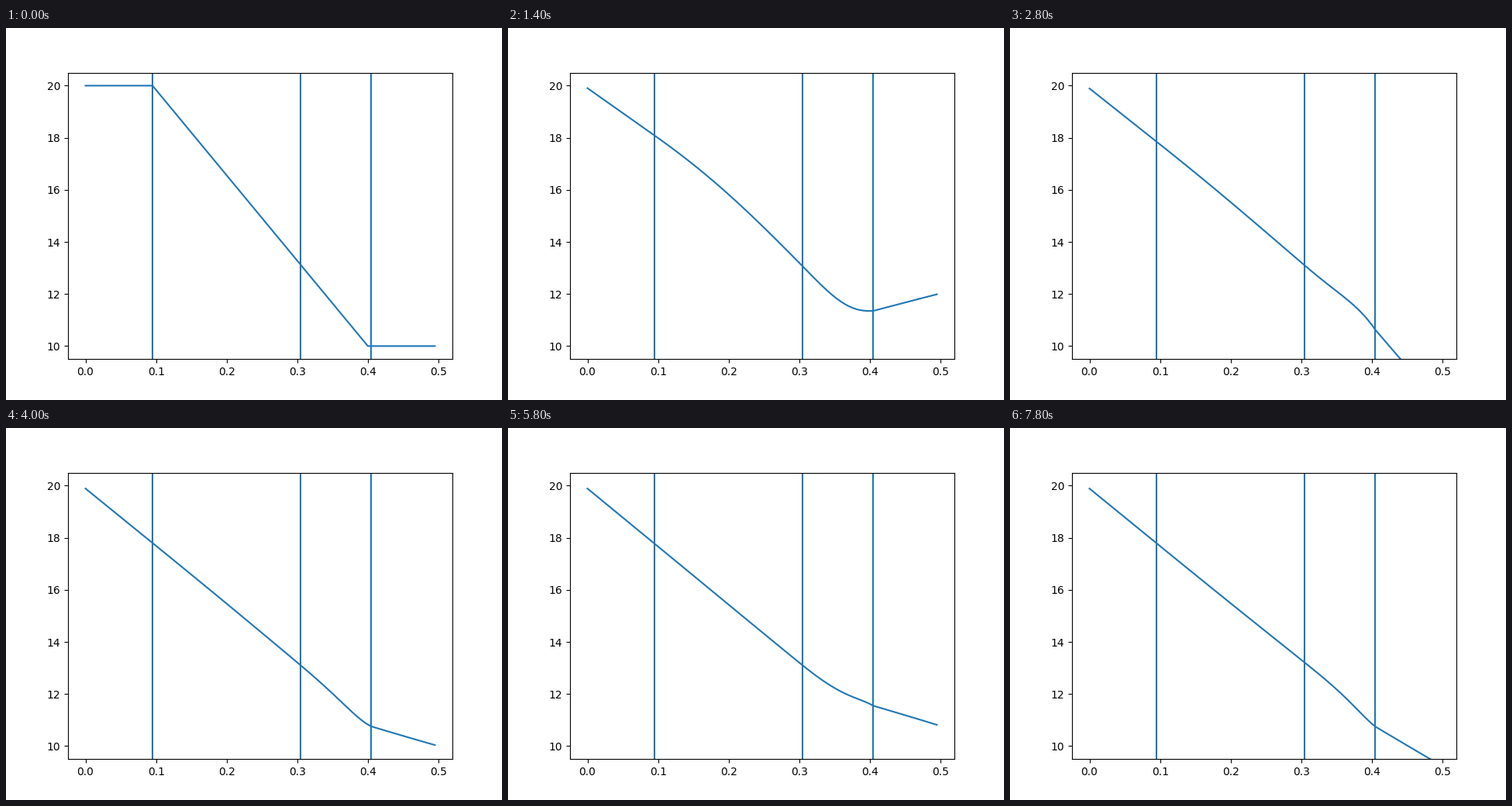
Write a matplotlib script that moves like this. It is 640 px wide and 480 px high and loops after 8 s.

```python
import numpy as np
import matplotlib.pyplot as plt
from matplotlib.animation import FuncAnimation

FRAMES, INTERVAL = 40, 200
N, DX = 100, 0.005
JOINTS = (19, 61, 81)
SUBSTEPS = 40

x = np.arange(N) * DX

# Diffusivity of each layer, in square metres per frame
alpha = np.full(N, 0.1)
alpha[JOINTS[0] + 1:JOINTS[1]] = 1.54e-3
alpha[JOINTS[1]:JOINTS[2]] = 1.74e-4

INSIDE = 20.0
JOINT_LOSS = 6.3  # change of slope at the outer joint


def outside(t):
    return 10 + 2.5 * np.sin(2 * np.pi * t / 20)


def simulate():
    """Temperature profile per frame, by implicit time steps."""
    dt = 1 / SUBSTEPS
    r = alpha * dt / DX**2
    system = np.diag(1 + 2 * r) - np.diag(r[:-1], 1) - np.diag(r[1:], -1)
    step = np.linalg.inv(system)

    temp = np.interp(x, [x[JOINTS[0]], 0.4], [20, 10])
    profiles = [temp]
    for k in range(1, (FRAMES - 1) * SUBSTEPS + 1):
        rhs = temp.copy()
        rhs[0] += r[0] * INSIDE
        rhs[-1] += r[-1] * outside(k * dt)
        rhs[JOINTS[2]] -= r[JOINTS[2]] * JOINT_LOSS * DX
        temp = step @ rhs
        if k % SUBSTEPS == 0:
            profiles.append(temp)
    return profiles


profiles = simulate()

fig, ax = plt.subplots(figsize=(6.4, 4.8), dpi=100)
curve, = ax.plot(x, profiles[0], color="C0")
for j in JOINTS:
    ax.axvline(x[j], color="C0")
ax.set_xlim(-0.02475, 0.51975)
ax.set_ylim(9.5, 20.5)


def update(n):
    curve.set_ydata(profiles[n])
    return curve,


anim = FuncAnimation(fig, update, frames=FRAMES, interval=INTERVAL,
                     repeat=True, repeat_delay=0)
plt.show()
```
